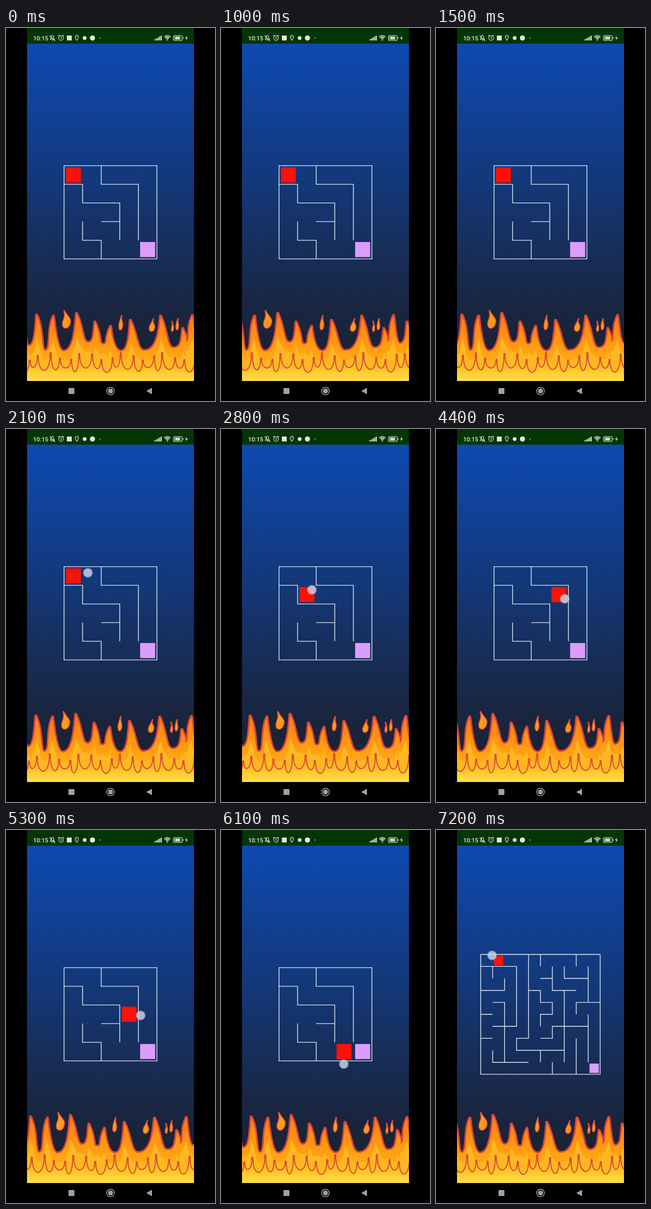
An HTML page with a canvas that plays this animation: 388 px wide and 690 px high, repeating every 7.3 s.

```html
<!DOCTYPE html>
<html>
<head>
<meta charset="utf-8">
<style>
html, body { margin: 0; width: 100%; height: 100%; overflow: hidden; background: #000; }
canvas { display: block; }
</style>
</head>
<body>
<canvas id="stage" width="388" height="690"></canvas>
<script>
const ctx = document.getElementById('stage').getContext('2d');
const LOOP = 7300, STEP = 100, LEVEL_UP = 6500;
const LEFT = 39, WIDTH = 310, TOP = 29, BOTTOM = 653;

// Walls are written in cell units.
const small = {
  x: 107.7, y: 254.6, cell: 34.5, n: 5, inset: 3.3,
  walls: 'M0 0H5V5H0ZM0 1H1V2H3V4M2 3H3M1 3V4H2V5M2 0V1H4V4'
};
const large = {
  x: 83, y: 230.2, cell: 22.17, n: 10, inset: 2.4,
  walls: 'M0 0H10V10H0ZM0 1H3V6H1M4 0V7H3V8H7M6 1V3H8M7 3V9M5 2H6M5 0V1M8 0V1' +
    'M7 1V2H9M9 1V4M10 4H8V5M9 5V9M9 6H6V7H5M4 3H5V4H6V5H5V6M8 7V10M6 9V10' +
    'M5 8V9M4 9H1V8M1 4H2V9M0 5H1M0 7H1M0 3H2V2M1 1V2'
};

// time, column, row
const moves = [[0, 0, 0], [2300, 1, 0], [2800, 1, 1], [3300, 2, 1], [3800, 3, 1], [5000, 3, 2],
  [5600, 3, 3], [5900, 3, 4], [6400, 4, 4], [LEVEL_UP, 0, 0], [7100, 1, 0]];

// time, x, y of the finger
const drags = [
  [[2000, 146, 264], [2100, 152, 266], [2500, 165, 278], [2900, 170, 304], [3500, 207, 310],
   [3900, 234, 311], [4700, 242, 316], [5300, 250, 343], [6100, 228, 433], [6400, 258, 428]],
  [[6900, 91, 234], [7200, 104, 232]]
];

// tip x, tip y, lean, then the valley to its right
const tongues = [[28, 548, -1, 43, 588], [57, 531, -1, 73, 597], [88, 533, 1, 107, 598],
  [131, 528, -1, 153, 582], [165, 544, -1, 180, 585], [194, 552, 1, 214, 598],
  [231, 541, -1, 257, 597], [287, 533, -1, 311, 592], [328, 556, -1, 334, 580],
  [346, 532, 1, 358, 584], [371, 544, -1, 392, 590]];

function tonguePath(rise, sink, bend) {
  let x = 8, y = 595 + sink, d = `M${x} 660V${y}`;
  for (const [tipX, tipY, lean, vx, valley] of tongues) {
    const ty = tipY + rise, vy = valley + sink, side = lean * bend;
    d += `C${x + (tipX - x) * .8} ${y} ${tipX - 7 - side} ${ty + 24} ${tipX} ${ty}`;
    d += `C${tipX + 8 - side} ${ty + 26} ${vx - (vx - tipX) * .55} ${vy} ${vx} ${vy}`;
    x = vx; y = vy;
  }
  return new Path2D(d + 'V660Z');
}

function dripPath() {
  let x = 6, d = 'M6 660V608';
  for (let i = 0; x < 385; i++) {
    const w = [17, 21, 15, 24][i % 4], low = 641 + 6 * Math.sin(i * 2.3);
    const cusp = 608 + 7 * Math.sin(i * 1.7);
    d += `C${x - 1} ${low} ${x + w + 1} ${low} ${x + w} ${cusp}`;
    x += w;
  }
  return new Path2D(d + 'V660Z');
}

function sparkPath(x, y, w, h, lean) {
  const tip = x - lean * w * .3;
  return new Path2D(`M${tip} ${y}C${tip + w * .5 * lean} ${y + h * .4} ${x + w * .9} ${y + h * .45} ${x + w * .4} ${y + h * .85}` +
    `C${x} ${y + h * 1.1} ${x - w * .6} ${y + h} ${x - w * .5} ${y + h * .7}C${x - w * .4} ${y + h * .45} ${tip + lean * 3} ${y + h * .4} ${tip} ${y}Z`);
}

const outer = tonguePath(0, 0, 5), inner = tonguePath(43, 17, 3), drips = dripPath();
const sparks = [[112, 523, 13, 32, 1], [213, 532, 6, 26, -1], [271, 538, 9, 23, -1],
  [309, 543, 3, 18, 1], [318, 538, 4, 20, -1]].map(s => sparkPath(...s));

function gradient(y0, y1, ...stops) {
  const g = ctx.createLinearGradient(0, y0, 0, y1);
  for (const [at, color] of stops) g.addColorStop(at, color);
  return g;
}
const sky = gradient(TOP, BOTTOM, [0, '#0e4ab0'], [.45, '#143673'], [.76, '#192744'], [1, '#1c1f29']);
const fire = gradient(530, 640, [0, '#ff7c18'], [.5, '#ff9a10'], [1, '#ffb41c']);
const embers = gradient(605, BOTTOM, [0, '#ffab1a'], [.6, '#ffc82c'], [1, '#ffe04c']);

function shape(path, fill, stroke, width) {
  if (stroke) {
    ctx.strokeStyle = stroke;
    ctx.lineWidth = width;
    ctx.stroke(path);
  }
  if (fill) {
    ctx.fillStyle = fill;
    ctx.fill(path);
  }
}

function disc(x, y, r, fill) {
  ctx.fillStyle = fill;
  ctx.beginPath();
  ctx.arc(x, y, r, 0, 7);
  ctx.fill();
}

function box(x, y, w, h, fill) {
  ctx.fillStyle = fill;
  ctx.fillRect(x, y, w, h);
}

function drawFlames(t) {
  ctx.save();
  ctx.beginPath();
  ctx.rect(LEFT, TOP, WIDTH, BOTTOM - TOP);
  ctx.clip();
  ctx.translate(13 * Math.cos(2 * Math.PI * t / 682) - 13, 0);
  ctx.lineJoin = 'round';
  for (const spark of sparks) shape(spark, '#ff9a1c', '#d9453c', 3);
  shape(outer, fire, '#d9433d', 6);
  shape(inner, '#ffb822');
  shape(drips, embers, '#dc4a30', 4);
  ctx.restore();
}

function drawMaze(maze, col, row) {
  const { x, y, cell, n, inset } = maze, size = cell - 2 * inset;
  const block = (c, r, color) => box(x + c * cell + inset, y + r * cell + inset, size, size, color);
  block(n - 1, n - 1, '#dc9cfc');
  block(col, row, '#ff1105');
  ctx.save();
  ctx.translate(x, y);
  ctx.scale(cell, cell);
  shape(new Path2D(maze.walls), null, '#dbe6f4', 1.4 / cell);
  ctx.restore();
}

function drawFinger(t) {
  for (const keys of drags) {
    if (t < keys[0][0] || t > keys.at(-1)[0]) continue;
    const i = Math.max(1, keys.findIndex(k => k[0] >= t));
    const [t0, x0, y0] = keys[i - 1], [t1, x1, y1] = keys[i];
    const p = (t - t0) / (t1 - t0), x = x0 + (x1 - x0) * p, y = y0 + (y1 - y0) * p;
    disc(x, y, 9.5, 'rgba(160,180,215,.35)');
    disc(x, y, 8, 'rgba(215,222,235,.7)');
  }
}

const icons = {
  bell: new Path2D('M82 21H90L88.5 19V16Q88 14 86 13.5Q84 14 83.500 16V19ZM81 14L91 24M85 23H87'),
  alarm: new Path2D('M106.500 18.500A4.300 4.300 0 1 1 97.900 18.500A4.300 4.300 0 1 1 106.500 18.500M102.200 16V18.800L104 20M97 15L99.500 13M107.400 15L105 13'),
  pin: new Path2D('M131.500 23Q128.500 18.500 128.500 16.500A3 3 0 0 1 134.500 16.500Q134.500 18.500 131.500 23M131 16.500H132'),
  battery: new Path2D('M313 14H325Q327 14 327 16V21Q327 23 325 23H313Q311 23 311 21V16Q311 14 313 14ZM329 17V20'),
  bolt: new Path2D('M336 14L332.500 19H335L334 23L337.500 18H335Z'),
  back: new Path2D('M260.500 671.500L271 665.500V677.500Z')
};

function drawStatusBar() {
  const ink = '#e3ebe0';
  box(LEFT, 0, WIDTH, TOP, '#043603');
  ctx.textAlign = 'left';
  ctx.font = '500 11px Roboto, sans-serif';
  ctx.fillStyle = ink;
  ctx.fillText('10:15', 50.5, 22.5);
  for (const name of ['bell', 'alarm', 'pin', 'battery']) shape(icons[name], null, ink, 1.1);
  shape(icons.bolt, ink);
  box(113, 14, 9, 9, ink);
  disc(146, 18.5, 3.5, ink);
  disc(160.500, 18.500, 4.8, ink);
  disc(174.500, 18.500, .9, ink);
  for (let i = 0; i < 5; i++) box(275.5 + i * 2.9, 21 - i * 1.7, 2, 2 + i * 1.7, ink);
  ctx.strokeStyle = ink;
  ctx.lineWidth = 1.4;
  for (const r of [3.5, 6, 8.5]) {
    ctx.beginPath();
    ctx.arc(299.5, 22.5, r, -2.35, -.79);
    ctx.stroke();
  }
  disc(299.5, 22, 1.2, ink);
  box(312.5, 15.5, 11, 6, '#8fae8c');
  ctx.font = '700 7px Roboto, sans-serif';
  ctx.textAlign = 'center';
  ctx.fillStyle = '#fff';
  ctx.fillText('80', 319, 21);
}

function drawNavBar() {
  const ink = '#a2a2a2';
  ctx.fillStyle = ink;
  ctx.beginPath();
  ctx.roundRect(116, 666, 11, 11, 1.5);
  ctx.fill();
  disc(194, 671.5, 7.8, ink);
  disc(194, 671.5, 6.3, '#000');
  disc(194, 671.5, 4.6, ink);
  shape(icons.back, ink);
}

function draw(t) {
  box(0, 0, 388, 690, '#000');
  box(LEFT, TOP, WIDTH, BOTTOM - TOP, sky);
  drawFlames(t);
  const [, col, row] = moves.findLast(m => m[0] <= t);
  drawMaze(t < LEVEL_UP ? small : large, col, row);
  drawFinger(t);
  drawStatusBar();
  drawNavBar();
}

function tick() {
  draw(Math.floor(performance.now() % LOOP / STEP) * STEP);
  requestAnimationFrame(tick);
}
tick();
</script>
</body>
</html>
```
